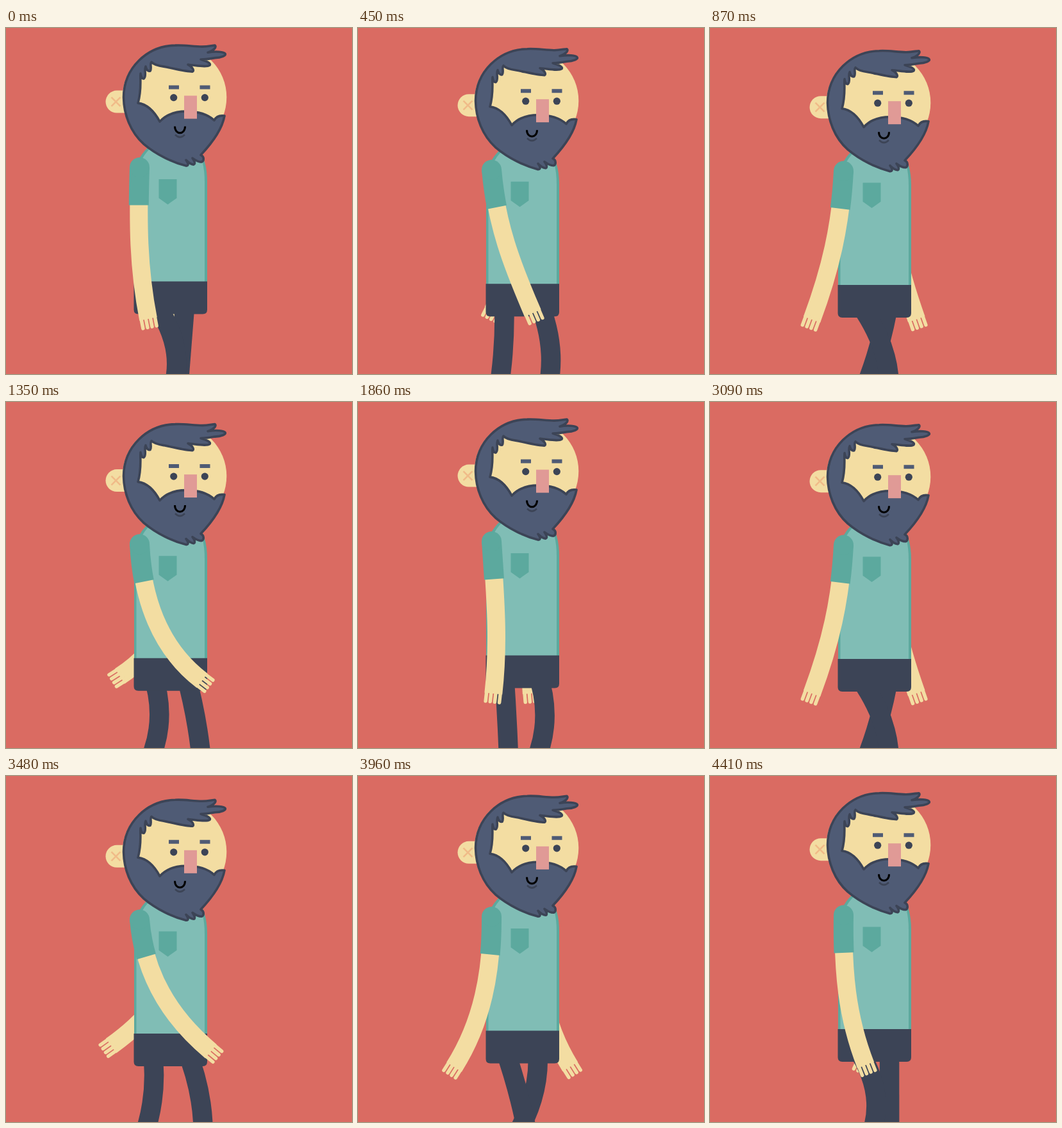
Animation, 540 px wide and 540 px high, one loop 4.44 s. Source, as an HTML page:

```html
<!DOCTYPE html>
<html lang="en">
<head>
<meta charset="utf-8">
<title>Walking man</title>
<style>
  html, body { margin: 0; height: 100%; overflow: hidden; background: #da6b62; }
  svg { display: block; width: 540px; height: 540px; }
  .skin { fill: #f3dda2; }
  .dark { fill: #3c4456; }
  .teal { fill: #5ca99e; }
  .slate { fill: #4f5b75; }
  .hair { fill: #4f5b75; stroke: #3c4456; stroke-width: 3.6; stroke-linejoin: round; }
  .line { fill: none; }
  .leg { stroke: #3c4456; stroke-width: 30.5; }
  .limb { stroke: #f3dda2; stroke-width: 28; }
  .sleeve { stroke: #5ca99e; stroke-width: 31; stroke-dasharray: 59 999; }
  .fingers { stroke: #f3dda2; stroke-width: 5.5; stroke-linecap: round; }
</style>
</head>
<body>
<svg viewBox="0 0 540 540">
  <defs>
    <path id="fingers" class="line fingers" d="M-10.8-3V13M-3.6-3V13M3.6-3V13M10.8-3V13"/>
  </defs>

  <g id="farArm">
    <path class="line limb"/>
    <use href="#fingers"/>
  </g>
  <path id="farLeg" class="line leg"/>
  <path id="nearLeg" class="line leg"/>

  <g id="body">
    <path class="teal" d="M200 397V238Q200 206 222 186H298Q314 205 314 240V397Z"/>
    <path fill="#80bdb5" d="M203.5 397V240Q203.5 208 227 186H296Q310 205 310 240V397Z"/>
    <path class="teal" d="M238.5 236H266.5V265.5L252.5 275.5L238.5 265.5Z"/>
    <path class="dark" d="M199.5 395.5H314V439.5Q314 446.5 307 446.5H206.5Q199.5 446.5 199.5 439.5Z"/>
  </g>

  <g id="head">
    <path class="skin" d="M190 97.5H173A17.5 17.5 0 0 0 173 132.5H195Z"/>
    <path class="line" stroke="#f0bb88" stroke-width="2.5" d="M164.5 108L178.5 122M178.5 108L164.5 122"/>
    <circle class="skin" cx="263" cy="108" r="81.3"/>
    <path class="hair" d="M264 27
      C278 26 292 29 306 29 C316 29 322 27 326 27 C329 29 325 35 315 38
      C328 36 340 37 342 40 C344 43 336 46 326 46.5 C318 48 311 49 304 49
      C314 52 320 55 318 58 C314 61 300 59 284 57
      C292 61 294 67 291 68 C280 68 262 63 246 60 C238 59 231 57 227 53
      C224 56 228 63 225 67 C221 68 219 64 218 60
      C215 66 220 75 215 79 C211 79 211 75 210 71
      C209 82 212 95 206 117
      C222 119 232 131 240 146 C250 135 264 130 281 130
      C300 130 314 134 325 144 C328 138 334 136 341 137
      C337 160 320 181 304 198 C310 201 309 208 305 209 C300 209 295 206 291 203
      C294 207 296 212 293 213 C289 213 285 210 281 206
      C284 210 286 215 281 215 C261 210 235 198 215 181
      C194 162 184 135 183.5 108 C184 62 220 28 264 27Z"/>
    <path class="slate" d="M254 89.5H270V95.5H254ZM302.5 89.5H318.5V95.5H302.5Z"/>
    <circle class="dark" cx="261.7" cy="108.5" r="5.6"/>
    <circle class="dark" cx="310.3" cy="108.5" r="5.6"/>
    <path fill="#e09a96" d="M278 105.5H298V141.5H278Z"/>
    <path class="line" stroke="#000" stroke-width="3" d="M263.5 153.5C263.5 167 279.5 167 279.5 153.5"/>
    <path class="line" stroke="#3c4456" stroke-width="2.5" d="M264 166.5Q271.5 174 279 166.5"/>
  </g>

  <g id="nearArm">
    <path class="line limb"/>
    <use href="#fingers"/>
    <path class="line sleeve"/>
    <circle class="teal" r="15.5"/>
  </g>
</svg>
<script>
const STEP = 37, STEPS = 120, STRIDE = 20;
const BACK = 4, FORWARD = 11; // step of the backmost pose, steps of the forward swing

const $ = id => document.getElementById(id);
const lerp = (a, b, k) => a + (b - a) * k;
const wave = (n, mean, size, peak, period = STRIDE) =>
  mean + size * Math.cos(2 * Math.PI * (n - peak) / period);
const shift = (id, y) => $(id).setAttribute("transform", `translate(0 ${y})`);

// Point at a distance from [x, y]; the angle is in degrees from straight down
function reach([x, y], angle, distance) {
  const a = angle * Math.PI / 180;
  return [x + Math.sin(a) * distance, y + Math.cos(a) * distance];
}

// 0 is fully back, 1 fully front: slow start forward, even return
function swing(n) {
  const u = (n - BACK + STRIDE) % STRIDE;
  if (u > FORWARD) return (STRIDE - u) / (STRIDE - FORWARD);
  return (1 - Math.cos(Math.PI * (u / FORWARD) ** 1.4)) / 2;
}

// The wrist travels along a shallow arc and the hand trails half a step behind
function drawArm(id, n, { shoulder, upper, x, lift, turn }) {
  const s = swing(n), angle = lerp(...turn, swing(n - .5));
  const wrist = [lerp(...x, s), 456 - lift * (s - .25) ** 2];
  const path = `M${shoulder}C${reach(shoulder, upper, 86)} ${reach(wrist, angle, -82)} ${wrist}`;
  for (const part of $(id).querySelectorAll(".limb, .sleeve")) part.setAttribute("d", path);
  $(id).querySelector("use").setAttribute("transform", `translate(${wrist}) rotate(${-angle})`);
  $(id).querySelector("circle")?.setAttribute("transform", `translate(${shoulder})`);
}

const drawLeg = (id, hip, knee, foot) =>
  $(id).setAttribute("d", `M${hip} 423Q${knee} 490 ${foot} 552`);

function draw(n) {
  const bodyY = wave(n, 2.9, 3.5, 4.1, STRIDE / 2);
  shift("body", bodyY);
  shift("head", wave(n, 5, 5.4, 4.3, STRIDE / 2));
  drawLeg("nearLeg", 228, wave(n, 255, 25, 1.5), wave(n, 249, 31, 3.5));
  drawLeg("farLeg", 280, wave(n, 289, 20, 12.5), wave(n, 275, 33, 14.5));
  drawArm("farArm", n, {
    shoulder: [278, 218 + bodyY], upper: 0, x: [343, 157], lift: 69, turn: [36, -63]
  });
  drawArm("nearArm", n, {
    shoulder: [208.5, 217.5 + bodyY], upper: wave(n, 1, 4, 12.5), x: [138, 327], lift: 52, turn: [-36, 58]
  });
}

const start = performance.now();
function tick() {
  draw(Math.floor((performance.now() - start) / STEP) % STEPS % STRIDE);
  requestAnimationFrame(tick);
}
tick();
</script>
</body>
</html>
```
